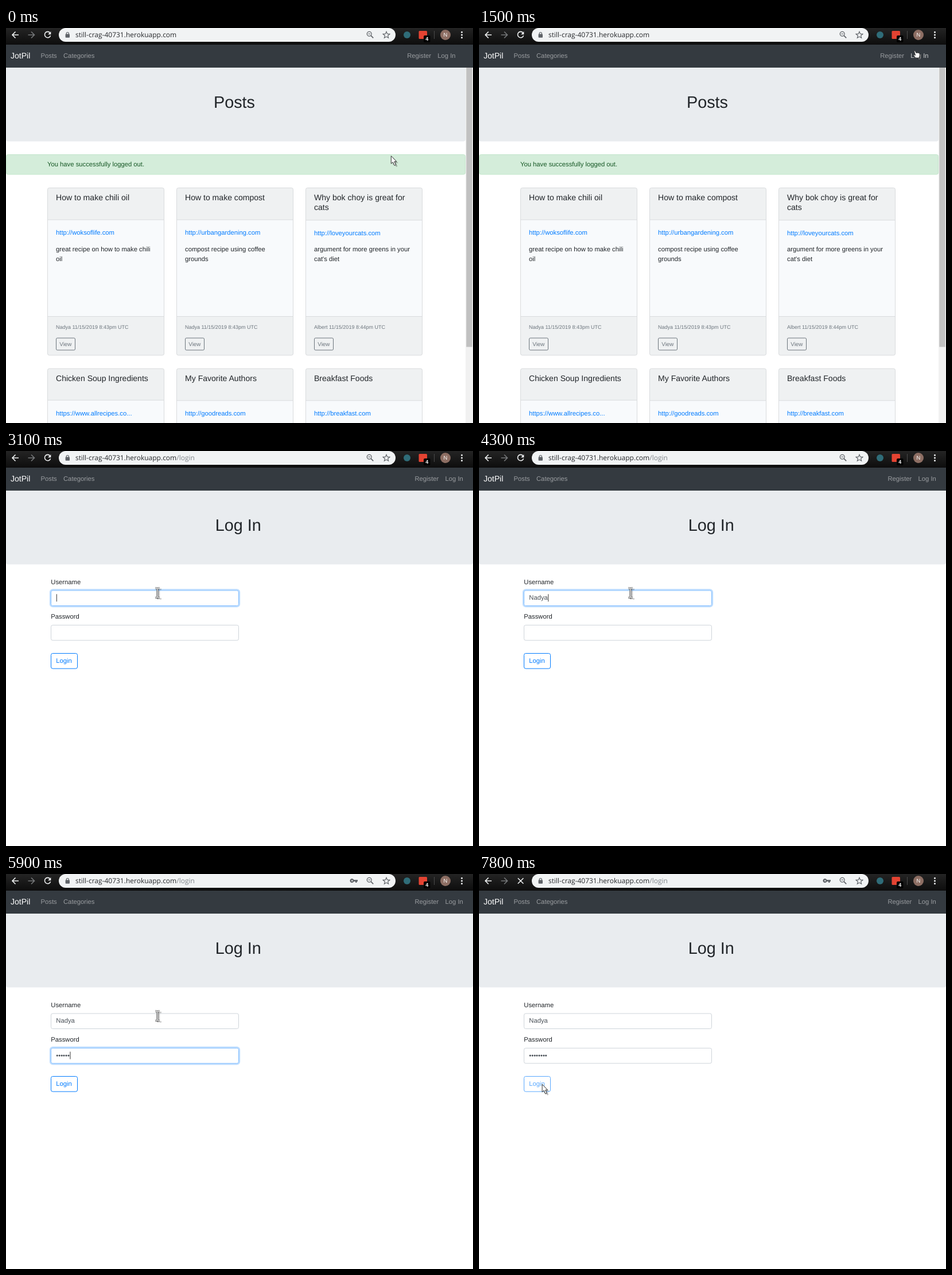
Animation of 814 by 688 pixels, one loop 8000 ms. Source, as an HTML page:

```html
<!DOCTYPE html>
<html lang="en">
<head>
<meta charset="utf-8">
<title>Log in walkthrough</title>
<style>
  html, body { margin: 0; width: 100%; height: 100%; overflow: hidden; background: #fff; }
  svg { display: block; width: 814px; height: 688px; font-family: "Liberation Sans", Arial, sans-serif; font-size: 11.25px; text-rendering: geometricPrecision; }
  text { white-space: pre; }
  .url { font: 12px "Open Sans", "Noto Sans", sans-serif; }
</style>
</head>
<body>
<svg id="stage" viewBox="0 0 814 688"></svg>
<script>
const LOOP = 8000;
const INK = '#212529', BLUE = '#007bff', MUTED = '#6c757d';

const text = (x, y, s, fill = INK, size = 11.25, extra = '') =>
  `<text x="${x}" y="${y}" fill="${fill}" font-size="${size}" ${extra}>${s}</text>`;
const rect = (x, y, w, h, fill, extra = '') =>
  `<rect x="${x}" y="${y}" width="${w}" height="${h}" fill="${fill}" ${extra}/>`;
const line = (d, color, width = 1.5, extra = '') =>
  `<path d="${d}" fill="none" stroke="${color}" stroke-width="${width}" ${extra}/>`;

function toolbar() {
  return rect(0, 0, 814, 29, 'url(#chrome)') +
    line('M22 12H11.5M16.5 6.5L11 12L16.5 17.5', '#f1f3f4', 1.6) +
    line('M38.5 12H49M44 6.5L49.5 12L44 17.5', '#77797b', 1.6) +
    `<g id="reload">${line('M76.6 8.2A5.2 5.2 0 1 0 77.6 13.2', '#f1f3f4', 1.6)}
      <path d="M78.3 6V11.2H73.1Z" fill="#f1f3f4"/></g>
    <g id="stop">${line('M67.8 7.2L77.4 16.8M77.4 7.2L67.8 16.8', '#f1f3f4', 1.6)}</g>` +
    rect(92, 0, 587, 24, '#f1f3f4', 'rx="12"') +
    rect(103.6, 10.5, 7.4, 6.2, '#5f6368', 'rx="1"') +
    line('M105.2 11V9.6A2.1 2.1 0 0 1 109.4 9.6V11', '#5f6368', 1.2) +
    `<text class="url" x="121" y="16" fill="#27292c">still-crag-40731.herokuapp.com<tspan id="path" fill="#80868b">/login</tspan></text>
    <g id="key"><path d="M606.4 10.3H613V13H611.6V15H609V13H606.4A3.6 3.6 0 1 1 606.4 10.3Z" fill="#5f6368"/>
      <circle cx="603.2" cy="11.7" r="1.2" fill="#f1f3f4"/></g>
    <circle cx="633.2" cy="10.3" r="3.9" fill="none" stroke="#5f6368" stroke-width="1.3"/>` +
    line('M631.2 10.3H635.2', '#5f6368', 1.1) + line('M636 13.1L640.2 17.3', '#5f6368', 1.7) +
    line('M663 6.3L664.6 10.2L668.8 10.5L665.6 13.2L666.6 17.3L663 15.1L659.4 17.3L660.4 13.2L657.2 10.5L661.4 10.2Z', '#5f6368', 1.2) +
    '<circle cx="699" cy="12" r="6" fill="#2f6c78"/>' +
    rect(719.5, 5, 14.5, 14, '#e44332', 'rx="1.5"') +
    rect(728, 13, 11.5, 12, '#000', 'rx="2"') +
    text(733.8, 22.2, '4', '#fff', 9, 'font-weight="bold" text-anchor="middle"') +
    rect(746, 5, 1, 14, '#4a4a4a') +
    '<circle cx="766" cy="12" r="9" fill="#8d6e63"/>' +
    text(766, 15.3, 'N', '#fff', 9.4, 'text-anchor="middle"') +
    [7.2, 12, 16.8].map(y => `<circle cx="794.5" cy="${y}" r="1.5" fill="#f1f3f4"/>`).join('');
}

function navbar() {
  return rect(0, 29, 814, 40, '#343a40') +
    text(8, 52.8, 'JotPil', '#fff', 14.06) +
    text(60.6, 52, 'Posts', '#9a9da0') + text(100, 52, 'Categories', '#9a9da0') +
    `<g id="account">${text(699.2, 52, 'Register', '#9a9da0')}${text(752.3, 52, 'Log In', '#9a9da0', 11.25, 'id="logIn"')}</g>`;
}

const jumbotron = (width, x, title) =>
  `<path d="M0 69H${width}V193.5a4 4 0 0 1-4 4H4a4 4 0 0 1-4-4Z" fill="#e9ecef"/>` + text(x, 139, title, INK, 28.8);

function card(col, top, linkY, { title, link, body = [], by }) {
  const x = 72.5 + col * 225, tx = x + 14.5, height = 291.5;
  const head = linkY - 26.3 - top + 4 - 4;
  const lines = (list, y) => list.map((s, i) => s && text(tx, y + i * 16.9, s)).join('');
  return rect(x, top, 203, height, '#f8fafc', 'rx="3"') +
    `<path d="M${x} ${top + head}V${top + 3}a3 3 0 0 1 3-3h197a3 3 0 0 1 3 3V${top + head}Z" fill="#eff1f2"/>` +
    `<path d="M${x} ${top + 224}h203V${top + height - 3}a3 3 0 0 1-3 3h-197a3 3 0 0 1-3-3Z" fill="#eff1f2"/>` +
    line(`M${x} ${top + head}h203M${x} ${top + 224}h203`, '#d9dbdd', 1) +
    rect(x, top, 203, height, 'none', 'rx="3" stroke="#d9dbdd"') +
    title.map((s, i) => text(tx, top + 21.2 + i * 16.9, s, INK, 14.06)).join('') +
    text(tx, linkY, link, BLUE) + lines(body, top + 110.5) +
    (by ? text(tx, top + 245, by, MUTED, 9) +
      rect(tx + .5, top + 261.5, 33, 21, 'none', `rx="2" stroke="${MUTED}"`) +
      text(tx + 6.3, top + 275, 'View', MUTED, 9.84) : '');
}

function postsPage() {
  const posts = [
    { title: ['How to make chili oil'], link: 'http://woksoflife.com', body: ['great recipe on how to make chili', 'oil'], by: 'Nadya 11/15/2019 8:43pm UTC' },
    { title: ['How to make compost'], link: 'http://urbangardening.com', body: ['compost recipe using coffee', 'grounds'], by: 'Nadya 11/15/2019 8:43pm UTC' },
    { title: ['Why bok choy is great for', 'cats'], link: 'http://loveyourcats.com', body: ['argument for more greens in your', "cat's diet"], by: 'Albert 11/15/2019 8:44pm UTC' },
    { title: ['Chicken Soup Ingredients'], link: 'https://www.allrecipes.co...' },
    { title: ['My Favorite Authors'], link: 'http://goodreads.com' },
    { title: ['Breakfast Foods'], link: 'http://breakfast.com' }
  ];
  const linkY = [360.3, 360.3, 361, 674.5, 675.2, 675.2];
  return jumbotron(801, 362, 'Posts') +
    rect(.5, 220.5, 800, 34.5, '#d4edda', 'rx="3" stroke="#c3e6cb"') +
    text(72, 241, 'You have successfully logged out.', '#155724') +
    posts.map((p, i) => card(i % 3, i < 3 ? 278.5 : 593.3, linkY[i], p)).join('') +
    rect(801, 29, 13, 659, '#f1f1f1') + rect(802.3, 42, 10.4, 513.5, '#c1c1c1') +
    '<path d="M804.5 38.2L807.5 35L810.5 38.2Z" fill="#8a8a8a"/>';
}

const field = (id, y) =>
  `<rect id="${id}Ring" x="77" y="${y - 1.5}" width="330" height="29.5" rx="4.5" fill="none" stroke="#bfdeff" stroke-width="2.4"/>` +
  rect(78.5, y, 327, 26.5, '#fff', `id="${id}Box" rx="3"`) +
  text(87.3, y + 16.2, '', '#495057', 11.25, `id="${id}Text"`);

function loginPage() {
  return jumbotron(814, 364.8, 'Log In') +
    text(78.3, 232, 'Username') + field('user', 243) +
    text(78.3, 292, 'Password') + field('pass', 303.3) +
    rect(0, 0, 1, 13, '#333', 'id="caret"') +
    `<g id="button">${rect(78.5, 352.5, 46, 26.5, '#fff', 'rx="3"')}
      ${rect(78.5, 352.5, 46, 26.5, BLUE, `id="fill" rx="3" stroke="${BLUE}"`)}
      ${text(87.2, 369, 'Login', BLUE, 11.25, 'id="label"')}</g>`;
}

function cursors() {
  const arrow = 'M.3 .3V13.8L3.4 11L6 17L8.5 16L5.9 10.2H9.8Z';
  const hand = 'M-2.6 .8Q-2-.4-.9 .6L1.2 4L3 3.4L4.4 4L5.7 3.9L7.2 5.4V9.2L6 12.6H.6L-3.3 8.6Q-3.6 7.2-2.2 7.2L-.4 8Z';
  const beam = 'M-4-8H-1.6L0-7L1.6-8H4M0-7V7.5M-4 8.5H-1.6L0 7.5L1.6 8.5H4';
  const solid = (id, d) => `<g id="${id}"><path d="${d}" transform="translate(3 2.5)" fill="#000" opacity=".25"/>
    <path d="${d}" fill="#fff" stroke="#333" stroke-width="1" stroke-linejoin="round"/></g>`;
  return `<g id="cursor">${solid('arrow', arrow)}${solid('hand', hand)}<g id="beam">
    ${line(beam, '#000', 2.4, 'transform="translate(3 2)" opacity=".2"')}
    ${line(beam, '#444', 3.2)}${line(beam, '#fff', 1.3)}</g></g>`;
}

const stage = document.getElementById('stage');
stage.innerHTML = `<defs><linearGradient id="chrome" x2="0" y2="1">
    <stop stop-color="#242424"/><stop offset="1" stop-color="#0d0d0d"/></linearGradient></defs>
  ${rect(0, 0, 814, 688, '#fff')}<g id="posts">${postsPage()}</g><g id="login">${loginPage()}</g>
  ${navbar()}${toolbar()}${cursors()}`;

const el = {};
stage.querySelectorAll('[id]').forEach(node => el[node.id] = node);
const set = (id, attrs) => { for (const k in attrs) el[id].setAttribute(k, attrs[k]); };
const show = (id, on) => set(id, { visibility: on ? 'visible' : 'hidden' });
const mix = (a, b, p) => a + (b - a) * p;
const rgb = (a, b, p) => `rgb(${a.map((v, i) => Math.round(mix(v, b[i], p)))})`;
const within = (t, a, b) => t >= a && t < b;
const count = (times, t) => times.filter(at => t >= at).length;

// Each move: start, number of 100 ms steps, end point.
const moves = [
  [400, 7, 750, 83], [1300, 3, 761, 39.5], [2000, 5, 257, 270], [3100, 1, 264, 247],
  [6600, 2, 273, 248], [6900, 2, 171, 336], [7200, 1, 111, 362], [7600, 1, 109.8, 366]
];
function pointer(t) {
  let x = 671, y = 222.5;
  for (const [start, steps, toX, toY] of moves) {
    if (t < start) break;
    const p = Math.min(1, (Math.floor((t - start) / 100) + 1) / steps);
    const e = p * p * (3 - 2 * p);
    x = mix(x, toX, e);
    y = mix(y, toY, e);
  }
  return { x, y };
}

const NAME = 'Nadya';
const nameKeys = [3600, 3900, 4000, 4100, 4300];
const passKeys = [5000, 5300, 5400, 5600, 5700, 5900, 6100, 6300];
const nameWidths = [0, .722, 1.278, 1.834, 2.334, 2.89];

function drawField(id, focus) {
  set(id + 'Ring', { opacity: focus });
  set(id + 'Box', { stroke: rgb([206, 212, 218], [128, 189, 255], focus) });
}

function draw(t) {
  const onLogin = t >= 1800;
  const { x, y } = pointer(t);
  show('posts', !onLogin);
  show('login', onLogin);
  show('path', onLogin);
  show('key', t >= 5000);
  show('reload', t < 7600);
  show('stop', t >= 7600);
  set('account', { transform: `translate(${onLogin ? 13.2 : 0} 0)` });

  const hover = y < 62 && x > 746;
  set('logIn', { fill: hover ? '#cccecf' : '#9a9da0' });
  const kind = hover || within(t, 7200, 7600) ? 'hand' : within(t, 3100, 6900) ? 'beam' : 'arrow';
  ['arrow', 'hand', 'beam'].forEach(id => show(id, id === kind));
  set('cursor', { transform: `translate(${x} ${y})` });

  const shift = t < 4700 ? 0 : t < 4800 ? .6 : 1;
  drawField('user', t < 3100 ? 0 : 1 - shift);
  drawField('pass', t < 7600 ? shift : 0);

  const letters = count(nameKeys, t), dots = count(passKeys, t);
  el.userText.textContent = NAME.slice(0, letters);
  el.passText.textContent = '•'.repeat(dots);
  const inPass = t >= 4700;
  const caretX = 87.8 + 11.25 * (inPass ? dots * .35 : nameWidths[letters]);
  set('caret', { x: caretX, y: inPass ? 309.5 : 249.3 });
  show('caret', within(t, 3100, 3300) || within(t, 3600, 6900) || within(t, 7400, 7600));

  const fill = within(t, 7200, 7400) ? .6 : within(t, 7400, 7600) ? 1 : within(t, 7600, 7800) ? .5 : 0;
  set('fill', { 'fill-opacity': fill });
  set('label', { fill: rgb([0, 123, 255], [255, 255, 255], fill) });
  set('button', { opacity: t >= 7600 ? .65 : 1 });
}

const origin = performance.now();
function tick() {
  draw((performance.now() - origin) % LOOP);
  requestAnimationFrame(tick);
}
tick();
</script>
</body>
</html>
```
